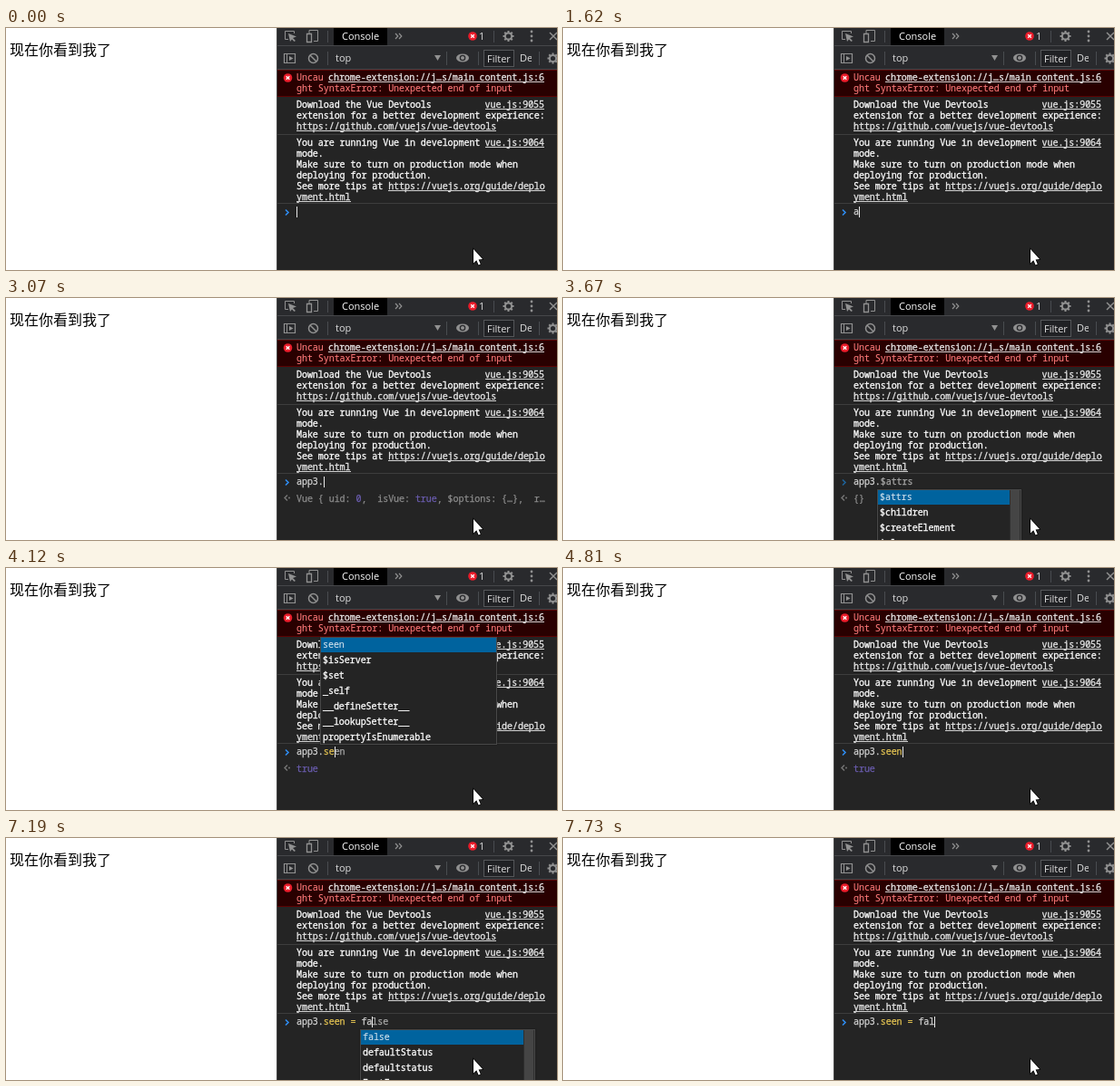
Animation of 607x267 px, one loop 8000 ms. Source, as an HTML page with a canvas:

```html
<!DOCTYPE html>
<html lang="zh">
<head>
<meta charset="utf-8">
<title>Console typing</title>
<style>
html, body { margin: 0; width: 100%; height: 100%; overflow: hidden; background: #fff; }
canvas { display: block; }
</style>
</head>
<body>
<canvas id="stage" width="607" height="267"></canvas>
<script>
const ctx = document.getElementById('stage').getContext('2d');
const MONO = '10px "Noto Sans Mono", "DejaVu Sans Mono", monospace';
const UI = '11px "Open Sans", "Noto Sans", sans-serif';
const CHAR = 5.95, LEFT = 320, RIGHT = 593, LOOP = 8000;
const ICON = '#919191', WHITE = '#fff', DIM = '#8c8c8c', PURPLE = '#6a5cae', YELLOW = '#e6c552';

function rect(x, y, w, h, color) {
  ctx.fillStyle = color;
  ctx.fillRect(x, y, w, h);
}
function label(str, x, y, color, font = UI) {
  ctx.font = font;
  ctx.letterSpacing = '0px';
  ctx.fillStyle = color;
  ctx.fillText(str, x, y);
}
// Console text, with a light stroke for extra weight.
function mono(str, x, y, color = WHITE, weight = 0.3) {
  ctx.font = MONO;
  ctx.letterSpacing = '-0.05px';
  ctx.fillStyle = ctx.strokeStyle = color;
  ctx.lineWidth = weight;
  ctx.fillText(str, x, y);
  ctx.strokeText(str, x, y);
}
function link(str, x, y) {
  mono(str, x, y, '#e8e8e8');
  rect(Math.round(x), y + 1, Math.round(str.length * CHAR), 1, '#d0d0d0');
}
function linkRight(str, y) {
  link(str, RIGHT - str.length * CHAR, y);
}
function runs(parts, x, y) {
  for (const [str, color] of parts) {
    mono(str, x, y, color, 0.25);
    x += str.length * CHAR;
  }
}
function path(points, color, width = 1, closed = false) {
  ctx.beginPath();
  points.forEach(([x, y]) => ctx.lineTo(x, y));
  if (closed) ctx.closePath();
  ctx.strokeStyle = color;
  ctx.lineWidth = width;
  ctx.stroke();
}
function fillPath(points, color) {
  ctx.beginPath();
  points.forEach(([x, y]) => ctx.lineTo(x, y));
  ctx.fillStyle = color;
  ctx.fill();
}
function disc(x, y, r, color) {
  ctx.beginPath();
  ctx.arc(x, y, r, 0, 7);
  ctx.fillStyle = color;
  ctx.fill();
}
function ring(x, y, r, color, width) {
  ctx.beginPath();
  ctx.arc(x, y, r, 0, 7);
  ctx.strokeStyle = color;
  ctx.lineWidth = width;
  ctx.stroke();
}
function cross(x, y, r, color, width) {
  path([[x - r, y - r], [x + r, y + r]], color, width);
  path([[x - r, y + r], [x + r, y - r]], color, width);
}
function chevron(x, y, color, r = 3) {
  path([[x, y - r], [x + r, y], [x, y + r]], color, 1.6);
}
function errorIcon(x, y) {
  disc(x, y, 4.8, '#eb1d2b');
  cross(x, y, 1.8, WHITE, 1.3);
}
function gear(x, y) {
  ring(x, y, 3.6, ICON, 2);
  for (let i = 0; i < 8; i++) {
    const c = Math.cos(i * Math.PI / 4), s = Math.sin(i * Math.PI / 4);
    path([[x + c * 4, y + s * 4], [x + c * 6, y + s * 6]], ICON, 2);
  }
}

function toolbars() {
  rect(298, 0, 309, 46, '#292a2d');
  rect(298, 19, 309, 1, '#46474a');
  rect(298, 45, 309, 1, '#46474a');

  path([[311, 12.5], [307.5, 12.5], [307.5, 3.5], [317.5, 3.5], [317.5, 6]], ICON);
  fillPath([[311, 6], [320, 9.5], [316, 11], [319, 14], [317.5, 15], [315, 12.5], [313, 15]], ICON);
  path([[334, 6], [334, 2.5], [343.5, 2.5], [343.5, 14.5], [339, 14.5]], ICON);
  path([[331.5, 6.5], [336.5, 6.5], [336.5, 15.5], [331.5, 15.5]], ICON, 1.3, true);
  rect(354, 3, 1, 13, '#494c50');
  rect(361, 0, 59, 19, '#000');
  label('Console', 370, 13, WHITE);
  for (const x of [429, 433]) path([[x, 6], [x + 2.8, 9], [x, 12]], ICON, 1.2);
  errorIcon(514, 9);
  label('1', 521, 13, '#dedede');
  rect(537, 3, 1, 13, '#494c50');
  gear(553.5, 9);
  for (const y of [4, 9, 14]) disc(579, y, 1.4, ICON);
  cross(603, 9, 4, ICON, 1.5);

  path([[306.5, 28.5], [318.5, 28.5], [318.5, 38.5], [306.5, 38.5]], ICON, 1.2, true);
  rect(309, 29, 1, 9, ICON);
  fillPath([[312, 31], [316.5, 33.5], [312, 36]], ICON);
  ring(338.5, 33.5, 5, ICON, 1.5);
  path([[335, 30], [342, 37]], ICON, 1.5);
  rect(354, 26, 1, 15, '#494c50');
  label('top', 363, 37, '#dedede');
  fillPath([[472, 30], [479, 30], [475.5, 36]], ICON);
  rect(485, 26, 1, 15, '#494c50');
  ctx.beginPath();
  ctx.ellipse(503, 33, 7, 4.5, 0, 0, 7);
  ctx.fillStyle = ICON;
  ctx.fill();
  disc(503, 33, 3.3, '#292a2d');
  disc(503, 33, 2, ICON);
  rect(520, 26, 1, 15, '#494c50');
  rect(526, 24, 34, 19, '#55575a');
  rect(527, 25, 32, 17, '#202124');
  label('Filter', 530, 38, '#dedede');
  ctx.save();
  ctx.beginPath();
  ctx.rect(564, 24, 15, 20);
  ctx.clip();
  label('De', 566, 37, '#dedede');
  ctx.restore();
  rect(587, 26, 1, 15, '#494c50');
  gear(602.5, 33.5);
}

function messages() {
  rect(298, 46, 309, 30, '#290000');
  rect(298, 46, 309, 1, '#5c0000');
  rect(298, 75, 309, 1, '#5c0000');
  errorIcon(310.5, 55);
  mono('Uncau', LEFT, 58, '#ff7b7b', 0.1);
  linkRight('chrome-extension://j…s/main_content.js:6', 58);
  mono('ght SyntaxError: Unexpected end of input', LEFT, 70, '#ff7b7b', 0.1);

  mono('Download the Vue Devtools', LEFT, 88);
  linkRight('vue.js:9055', 88);
  mono('extension for a better development experience:', LEFT, 100);
  link('https://github.com/vuejs/vue-devtools', LEFT, 112);
  rect(298, 117, 309, 1, '#3d3d3d');

  mono('You are running Vue in development', LEFT, 130);
  linkRight('vue.js:9064', 130);
  ['mode.', 'Make sure to turn on production mode when', 'deploying for production.', 'See more tips at']
    .forEach((line, i) => mono(line, LEFT, 142 + i * 12));
  link('https://vuejs.org/guide/deplo', LEFT + 17 * CHAR, 178);
  link('yment.html', LEFT, 190);
  rect(298, 193, 309, 1, '#3d3d3d');
}

// Items starting with ">" are history entries.
function popup({ x, y, w, items, scroll }) {
  const h = items.length * 17;
  const inner = w - (scroll ? 13 : 1);
  ctx.save();
  ctx.shadowColor = 'rgba(0,0,0,.4)';
  ctx.shadowBlur = 2;
  rect(x, y, w, h, '#484848');
  ctx.restore();
  rect(x + 1, y + 1, w - 2, h - 2, '#242424');
  if (scroll) {
    rect(x + inner, y + 1, 12, h - 2, '#2f2f2f');
    rect(x + inner + 1, y + 1, 10, h - 2, '#454545');
  }
  rect(x + 1, y + 1, inner - 1, 16, '#00639e');
  items.forEach((item, i) => {
    const base = y + 12 + i * 17;
    if (item[0] === '>') {
      chevron(x + 5, base - 4, '#2386d8');
      mono(item.slice(1), x + 11.5, base);
    } else if (i) mono(item, x + 3, base);
    else mono(item, x + 3, base, '#d6e4ee', 0.1);
  });
}

const lists = {
  a: { x: 317, y: 211, w: 272, scroll: true,
    items: ['addEventListener', 'alert', 'app3', 'atob'] },
  app: { x: 317, y: 127, w: 159,
    items: ['app3', 'onappinstalled', '>app2.message = "OK"', ">app.message = 'OK'"] },
  members: { x: 346, y: 211, w: 159, scroll: true,
    items: ['$attrs', '$children', '$createElement', '$el'] },
  s: { x: 346, y: 211, w: 159, scroll: true,
    items: ['seen', '$attrs', '$isServer', '$listeners'] },
  se: { x: 346, y: 76, w: 195,
    items: ['seen', '$isServer', '$set', '_self', '__defineSetter__', '__lookupSetter__', 'propertyIsEnumerable'] },
  f: { x: 373, y: 211, w: 233, scroll: true,
    items: ['false', 'fetch', 'find', 'focus'] },
  fa: { x: 390, y: 211, w: 193, scroll: true,
    items: ['false', 'defaultStatus', 'defaultstatus', 'FontFace'] }
};

const results = {
  pending: [],
  vue: [['Vue { uid: ', DIM], ['0', PURPLE], [',  isVue: ', DIM], ['true', PURPLE],
    [', $options: {…},  r…', DIM]],
  empty: [['{}', DIM]],
  yes: [['true', PURPLE]]
};

// Each step changes part of the prompt's state at a time in ms.
const steps = [
  [0, { typed: '', ghost: '', caret: true, list: null, result: null, dim: false }],
  [310, { caret: false }],
  [770, { caret: true }],
  [1310, { caret: false }],
  [1620, { typed: 'a', caret: true }],
  [1680, { ghost: 'ddEventListener', list: 'a' }],
  [1850, { result: 'pending' }],
  [2070, { typed: 'ap', ghost: 'p3' }],
  [2150, { typed: 'app', ghost: '3', list: 'app', result: 'vue' }],
  [2680, { typed: 'app3', ghost: '', list: null }],
  [3070, { typed: 'app3.' }],
  [3140, { result: null, dim: true }],
  [3220, { ghost: '$attrs', list: 'members' }],
  [3290, { result: 'empty' }],
  [3670, { caret: false }],
  [3900, { typed: 'app3.s', ghost: 'een', caret: true, list: 's', dim: false }],
  [4050, { typed: 'app3.se', ghost: 'en', list: 'se', result: 'pending' }],
  [4120, { result: 'yes' }],
  [4270, { typed: 'app3.see', ghost: 'n', list: null }],
  [4810, { typed: 'app3.seen', ghost: '' }],
  [5350, { caret: false }],
  [5810, { typed: 'app3.seen ', caret: true }],
  [6350, { caret: false }],
  [6420, { typed: 'app3.seen =', caret: true }],
  [6500, { result: null, dim: true }],
  [6570, { typed: 'app3.seen = ' }],
  [6880, { typed: 'app3.seen = f', ghost: 'alse', list: 'f', dim: false }],
  [7190, { typed: 'app3.seen = fa', ghost: 'lse', list: 'fa' }],
  [7650, { typed: 'app3.seen = fal', ghost: '' }],
  [7730, { list: null }]
];

function prompt({ typed, ghost, caret, list, result, dim }) {
  const [, object, member, value] = typed.match(/^(\w*\.?)(\S*\s*=?\s*)(.*)$/);
  const end = Math.round(LEFT + typed.length * CHAR);
  chevron(308, 203.5, dim ? '#1f639b' : '#2f8cf0');
  runs([[object, '#d5d5d5'], [member, YELLOW], [value, '#d5d5d5'], [ghost, '#a8a8a8']], LEFT, 206);
  if (caret) rect(end, 197, 1, 12, '#e8e8e8');
  if (result) {
    path([[310, 217.5], [307, 220.5], [310, 223.5]], '#777', 1.4);
    disc(312, 220.5, 1, '#777');
    runs(results[result], LEFT, 225);
  }
  if (list) popup(lists[list]);
}

function pointer() {
  const shape = [[515, 244], [515, 259.5], [518.3, 256.3], [520.6, 261.5], [522.8, 260.5], [520.6, 255.4], [525, 255]];
  path(shape, '#000', 1.4, true);
  fillPath(shape, WHITE);
}

function draw(now) {
  const time = now % LOOP;
  const state = Object.assign({}, ...steps.filter(([at]) => at <= time).map(([, change]) => change));
  rect(0, 0, 607, 267, WHITE);
  label('现在你看到我了', 4, 30, '#000', '16px "Noto Sans CJK SC", "Noto Sans CJK", sans-serif');
  rect(298, 0, 309, 267, '#242424');
  toolbars();
  messages();
  rect(298, 0, 1, 267, '#474747');
  prompt(state);
  pointer();
}

const start = performance.now();
function tick() {
  draw(performance.now() - start);
  requestAnimationFrame(tick);
}
tick();
</script>
</body>
</html>
```
